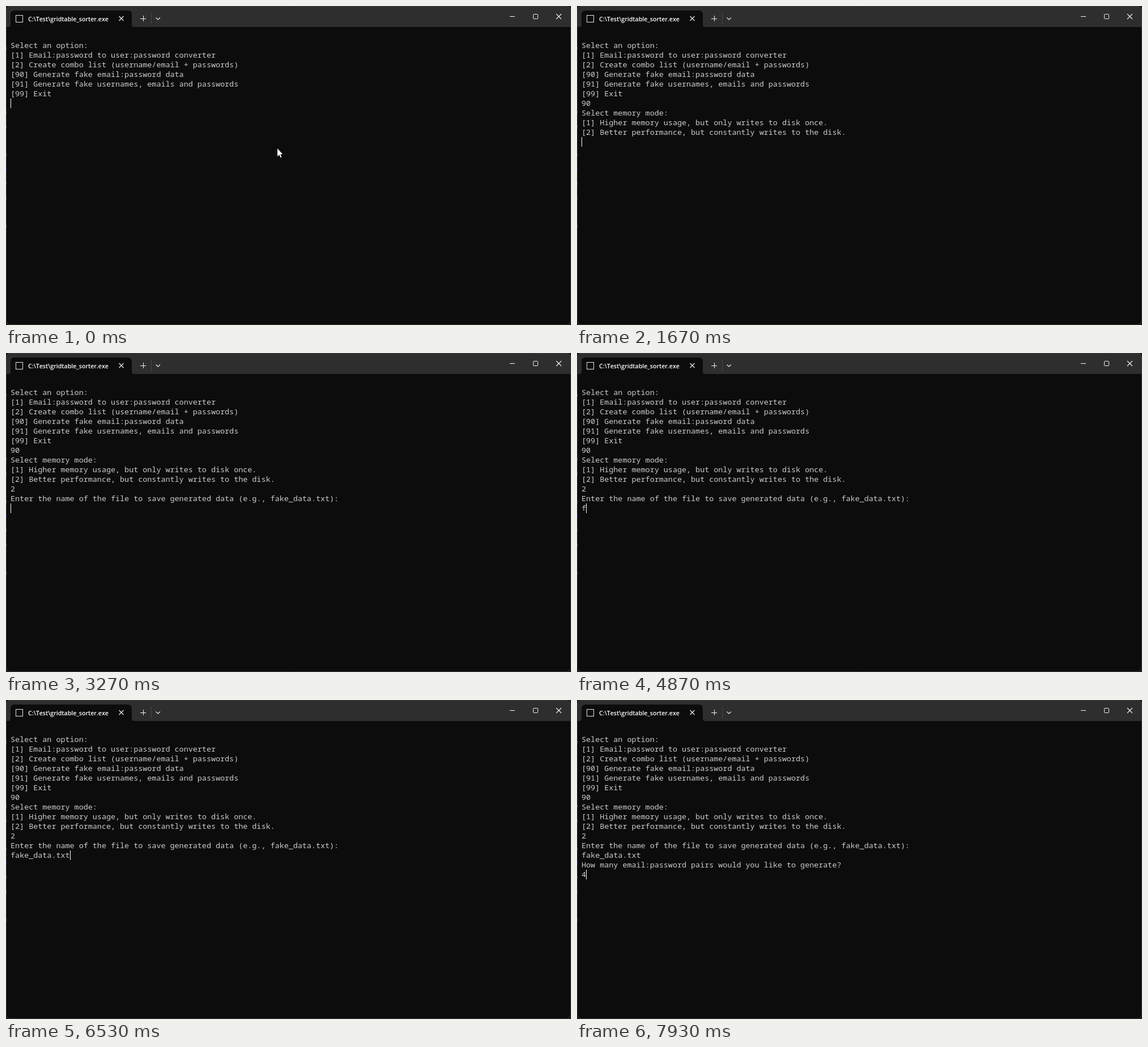
An HTML page with a canvas for the animation above (8000 ms loop, 997x562 px).

```html
<!DOCTYPE html>
<html lang="en">
<head>
<meta charset="utf-8">
<title>Terminal</title>
<style>
  html, body { margin: 0; width: 100%; height: 100%; overflow: hidden; background: #0c0c0c; }
  canvas { display: block; }
</style>
</head>
<body>
<canvas id="stage" width="997" height="562"></canvas>
<script>
const ctx = document.getElementById('stage').getContext('2d');
const W = 997, H = 562, LOOP = 8000;
const LEFT = 8, TOP = 61, ROW = 17, CELL = 8.055, BASE = 13;
const MONO = '500 13.42px "Noto Sans Mono", "DejaVu Sans Mono", monospace';
const UI = '600 10.6px "Open Sans", "Noto Sans", sans-serif';

const menu = [
  'Select an option:',
  '[1] Email:password to user:password converter',
  '[2] Create combo list (username/email + passwords)',
  '[90] Generate fake email:password data',
  '[91] Generate fake usernames, emails and passwords',
  '[99] Exit'
];

// Each prompt: when its lines appear, when keys land, when the caret is hidden.
const prompts = [
  { at: 0, lines: menu, input: '90', keys: [1200, 1330], off: [670, 1200] },
  { at: 1670, lines: [
      'Select memory mode:',
      '[1] Higher memory usage, but only writes to disk once.',
      '[2] Better performance, but constantly writes to the disk.'
    ], input: '2', keys: [2870], off: [2270, 2800] },
  { at: 3270, lines: ['Enter the name of the file to save generated data (e.g., fake_data.txt):'],
    input: 'fake_data.txt',
    keys: [4870, 5000, 5130, 5200, 5470, 5600, 5800, 5870, 5930, 6070, 6130, 6330, 6530],
    off: [3930, 4400] },
  { at: 6670, lines: ['How many email:password pairs would you like to generate?'],
    input: '4', keys: [7930], off: [7270, 7800] }
];

function rect(x, y, w, h, color) {
  ctx.fillStyle = color;
  ctx.fillRect(x, y, w, h);
}

function stroke(color, width, ...lines) {
  ctx.strokeStyle = color;
  ctx.lineWidth = width;
  ctx.beginPath();
  for (const [x, y, ...rest] of lines) {
    ctx.moveTo(x, y);
    for (let i = 0; i < rest.length; i += 2) ctx.lineTo(rest[i], rest[i + 1]);
  }
  ctx.stroke();
}

function cross(x, y, r) {
  stroke('#f4f4f4', 1.1, [x - r, y - r, x + r, y + r], [x + r, y - r, x - r, y + r]);
}

function drawTab() {
  ctx.fillStyle = '#0c0c0c';
  ctx.beginPath();
  ctx.moveTo(4, 37);
  ctx.quadraticCurveTo(8, 37, 8, 33);
  ctx.lineTo(8, 15);
  ctx.quadraticCurveTo(8, 8, 15, 8);
  ctx.lineTo(215, 8);
  ctx.quadraticCurveTo(222, 8, 222, 15);
  ctx.lineTo(222, 33);
  ctx.quadraticCurveTo(222, 37, 226, 37);
  ctx.fill();

  ctx.strokeStyle = '#e6e6e6';
  ctx.lineWidth = 1;
  ctx.strokeRect(17.5, 16.5, 12, 12);

  ctx.font = UI;
  ctx.fillStyle = '#fff';
  ctx.fillText('C:\\Test\\gridtable_sorter.exe', 39, 27);
  cross(203.5, 22, 4);
}

function drawWindow() {
  rect(0, 0, W, H, '#1c1c1c');
  ctx.save();
  ctx.beginPath();
  ctx.roundRect(0, 0, W, H, 8);
  ctx.clip();
  rect(0, 0, W, H, '#0c0c0c');
  rect(0, 0, W, 37, '#2e2e2e');
  drawTab();
  ctx.restore();

  ctx.strokeStyle = '#3c3c3c';
  ctx.lineWidth = 1;
  ctx.beginPath();
  ctx.roundRect(0.5, 0.5, W - 1, H - 1, 7.5);
  ctx.stroke();

  // Slivers of the window behind
  for (const y of [72, 185, 210, 260, 310, 336, 385]) rect(0, y, 1, 5, '#707070');
  rect(0, 284, 1, 5, '#4646b4');

  stroke('#f0f0f0', 1, [237, 22.5, 247, 22.5], [242.5, 17, 242.5, 27]);
  stroke('#454545', 1, [256.5, 12, 256.5, 32]);
  stroke('#f0f0f0', 1.1, [264.5, 20.5, 268.2, 24, 272, 20.5]);
  stroke('#f4f4f4', 1, [889, 18.5, 898, 18.5]);
  ctx.beginPath();
  ctx.roundRect(930.5, 14.5, 8, 8, 1);
  ctx.stroke();
  cross(975.5, 18.5, 4.5);
}

function drawPointer() {
  ctx.fillStyle = '#fff';
  ctx.beginPath();
  ctx.moveTo(479, 251);
  for (const [x, y] of [[479, 265], [482.2, 262], [484.4, 267], [486.3, 266.2], [484.2, 261.3], [488, 261]]) {
    ctx.lineTo(x, y);
  }
  ctx.fill();
}

function print(text, row) {
  ctx.fillText(text, LEFT, TOP + row * ROW + BASE);
}

function drawTerminal(t) {
  const shown = prompts.filter(p => t >= p.at);
  let row = 0, typed = '';
  ctx.font = MONO;
  ctx.fillStyle = '#cccccc';
  for (const p of shown) {
    for (const line of p.lines) print(line, row++);
    typed = p.input.slice(0, p.keys.filter(k => t >= k).length);
    print(typed, row++);
  }
  const [hide, show] = shown[shown.length - 1].off;
  if (t < hide || t >= show) {
    rect(Math.round(LEFT + typed.length * CELL), TOP + (row - 1) * ROW, 1, ROW, '#fff');
  }
}

function frame(now) {
  const t = now % LOOP;
  drawWindow();
  drawTerminal(t);
  if (t < prompts[0].keys[0]) drawPointer();
  requestAnimationFrame(frame);
}

ctx.fontKerning = 'none';
frame(0);
</script>
</body>
</html>
```
